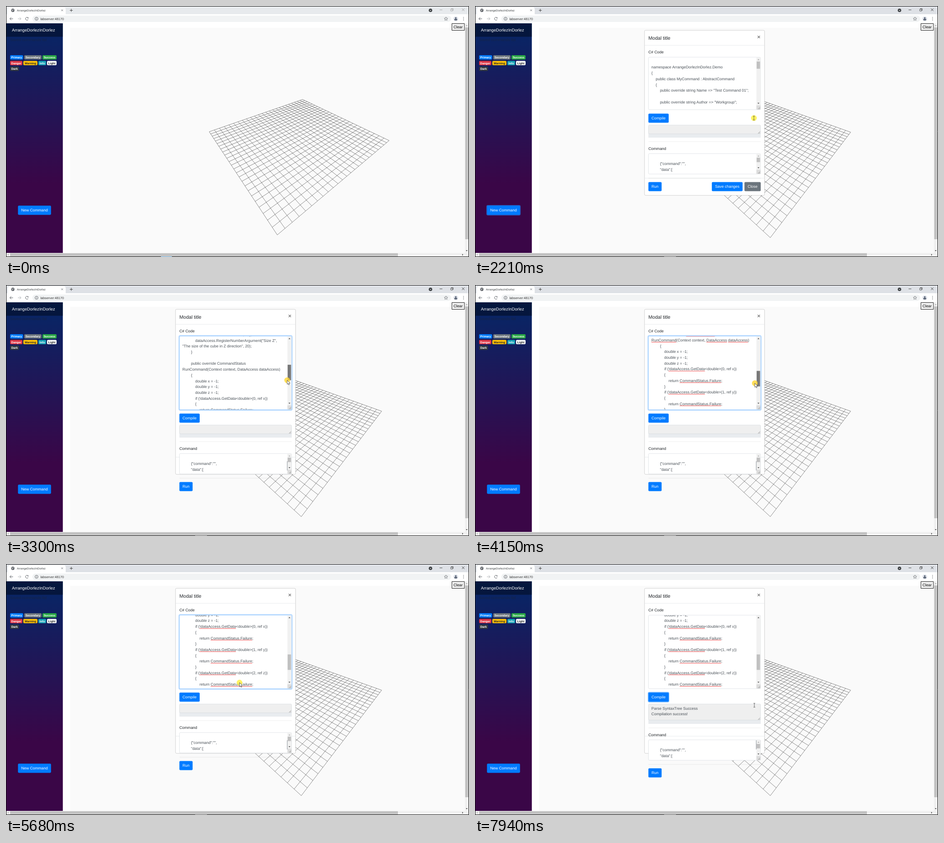
Write an HTML page with a canvas that moves like this. It is 1016x551 px and loops after 8 s.

```html
<!DOCTYPE html>
<html lang="en">
<head>
<meta charset="utf-8">
<title>Command editor</title>
<style>
html, body { margin: 0; width: 100%; height: 100%; overflow: hidden; background: #fff; }
canvas { display: block; }
</style>
</head>
<body>
<canvas id="stage" width="1016" height="551"></canvas>
<script>
const ctx = document.getElementById('stage').getContext('2d');
const LOOP = 8000, LINE = 12.7, SIZE = 8.467;
const APP = 'ArrangeDorlezInDorlez';
const BLUE = '#007bff', INK = '#212529', CODE_INK = '#495057';
const ARROW = '#505050', ARROW_OFF = '#a8a8a8';

const CODE = `
namespace ${APP}.Demo
{
    public class MyCommand : AbstractCommand
    {
        public override string Name => "Test Command 01";

        public override string Author => "Workgroup";

        public override string Description =>
"Creates a cube with the given size in the
current context";

        public override void
RegisterInputs(DataAccess dataAccess)
        {
            dataAccess.RegisterNumberArgument("Size X",
"The size of the cube in X direction", 20);
            dataAccess.RegisterNumberArgument("Size Y",
"The size of the cube in Y direction", 20);
            dataAccess.RegisterNumberArgument("Size Z",
"The size of the cube in Z direction", 20);
        }

        public override CommandStatus
RunCommand(Context context, DataAccess dataAccess)
        {
            double x = -1;
            double y = -1;
            double z = -1;
${['x', 'y', 'z'].map((v, i) => `            if (!dataAccess.GetData<double>(${i}, ref ${v}))
            {
                return CommandStatus.Failure;
            }`).join('\n')}

            context.AddCube(x, y, z, 20, 20, 20);

            return CommandStatus.Success;
        }
    }
}
`.split('\n');
const COMMAND = ['', '        {"command":"",', '        "data":[', '        ]}'];
const OUTPUT = ['Parse SyntaxTree Success', 'Compilation success!'];
const MISSPELT = /!?dataAccess(\.\w+)?|DataAccess|RunCommand|CommandStatus(\.\w+)?/g;

const BADGES = [
  ['Primary', 9, 108, 28.5, BLUE], ['Secondary', 40, 108, 38, '#6c757d'], ['Success', 80, 108, 31, '#28a745'],
  ['Danger', 9, 120.5, 27, '#dc3545'], ['Warning', 38, 120.5, 31, '#ffc107', INK],
  ['Info', 71, 120.5, 17, '#17a2b8'], ['Light', 90, 120.5, 21, '#f8f9fa', INK], ['Dark', 9, 133, 19.5, '#343a40']
];

// time, x, y, pointer shape
const POINTER = [
  [150, 882, 302, 'arrow'], [300, 622, 302, 'arrow'], [460, 622, 302, 'arrow'], [800, 690, 306, 'arrow'],
  [1230, 62, 450, 'hand'], [1450, 62, 450, 'arrow'], [1950, 612, 246, 'beam'], [2220, 612, 246, 'beam'],
  [2380, 624, 224, 'resize'], [2450, 624, 224, 'resize'], [2910, 624, 270, 'arrow'], [2990, 624, 268, 'arrow'],
  [3080, 620, 155, 'arrow'], [3300, 617, 209, 'arrow'], [3830, 615, 212, 'arrow'], [4150, 614, 215.5, 'arrow'],
  [4460, 614, 215.5, 'arrow'], [4930, 613, 233, 'arrow'], [5220, 613, 233, 'arrow'], [5400, 613, 227, 'arrow'],
  [5980, 402, 297, 'hand'], [6930, 402, 297, 'hand'], [7000, 408, 300, 'beam'], [7310, 613, 316, 'beam'],
  [7470, 613, 316, 'beam'], [7560, 624, 323, 'resize'], [7800, 624, 339, 'beam'], [7940, 613, 310, 'beam']
];
const SCROLL = [[3080, 0], [3300, 254], [3750, 300], [3830, 300], [4150, 318.3], [4230, 318.3],
  [4460, 318.3], [4930, 393], [5220, 393], [5400, 365.6]];

const mix = (a, b, k) => a + (b - a) * k;
function ease(t, from, to) {
  const k = Math.min(1, Math.max(0, (t - from) / (to - from)));
  return k * k * (3 - 2 * k);
}
function track(keys, t, col = 1) {
  const i = keys.findIndex(k => k[0] > t);
  if (i < 0) return keys.at(-1)[col];
  if (!i) return keys[0][col];
  return mix(keys[i - 1][col], keys[i][col], ease(t, keys[i - 1][0], keys[i][0]));
}

function rect(x, y, w, h, fill) {
  ctx.fillStyle = fill;
  ctx.fillRect(x, y, w, h);
}
function box(x, y, w, h, r, fill, stroke, width = .6) {
  ctx.beginPath();
  ctx.roundRect(x, y, w, h, r);
  if (fill) { ctx.fillStyle = fill; ctx.fill(); }
  if (stroke) { ctx.strokeStyle = stroke; ctx.lineWidth = width; ctx.stroke(); }
}
function disc(x, y, r, fill, stroke) {
  box(x - r, y - r, 2 * r, 2 * r, r, fill, stroke, .9);
}
function path(points, stroke, width = 1, fill) {
  ctx.beginPath();
  for (let i = 0; i < points.length; i += 2) ctx.lineTo(points[i], points[i + 1]);
  if (fill) { ctx.closePath(); ctx.fillStyle = fill; ctx.fill(); }
  if (stroke) { ctx.strokeStyle = stroke; ctx.lineWidth = width; ctx.stroke(); }
}
function text(s, x, y, fill = INK, size = SIZE, align = 'left', weight = 400) {
  ctx.font = `${weight} ${size}px "Liberation Sans", Arial, sans-serif`;
  ctx.textAlign = align;
  ctx.fillStyle = fill;
  ctx.fillText(s, x, y);
}
function button(label, x, y, w, fill, ring) {
  if (ring) box(x - .6, y - .6, w + 1.2, 21.3, 2.7, null, 'rgba(38,143,255,.6)', 1.5);
  box(x, y, w, 20.1, 2.1, fill);
  text(label, x + w / 2, y + 12.9, '#fff', SIZE, 'center');
}
function arrowhead(x, y, dx, dy, fill = ARROW) {
  path([x + dx * 1.4, y + dy * 1.4, x - dx - dy * 2, y - dy - dx * 2, x - dx + dy * 2, y - dy + dx * 2], null, 0, fill);
}
function gripLines(y) {
  for (const d of [2, 4.5]) path([625.5 - d, y, 625.5, y - d], '#777', .7);
}
function grip(y) {
  rect(617.5, y - 9.5, 9, 9, '#dcdcdc');
  gripLines(y - 1);
}
function scrollbar(top, bottom, start, length, { held, scrolled } = {}) {
  rect(617.5, top, 9, bottom - top, '#f1f1f1');
  rect(618, start, 7.5, length, held ? '#787878' : '#c1c1c1');
  arrowhead(622, top + 5, 0, -1, scrolled ? ARROW : ARROW_OFF);
  arrowhead(622, bottom - 5, 0, 1);
}
function textarea(y, h, lines, { scroll = 0, fill = '#fff', focus, misspelt } = {}) {
  if (focus) box(379.7, y - .7, 248, h + 1.4, 2.5, null, 'rgba(0,123,255,.3)', 2);
  box(380.7, y + .3, 246, h - .6, 2.1, fill, focus ? '#80bdff' : '#ced4da');
  ctx.save();
  ctx.beginPath();
  ctx.rect(381, y + .6, 236, h - 1.2);
  ctx.clip();
  lines.forEach((line, i) => {
    const base = y + 12.7 + i * LINE - scroll;
    if (base < y - 4 || base > y + h + 10) return;
    text(line, 387.1, base, CODE_INK);
    if (misspelt) for (const m of line.matchAll(MISSPELT)) {
      const x = 387.1 + ctx.measureText(line.slice(0, m.index)).width;
      path([x, base + 1.6, x + ctx.measureText(m[0]).width, base + 1.6], '#f04040', .9);
    }
  });
  ctx.restore();
}

function drawChrome(active) {
  const ink = '#5f6368', dark = active ? '#222' : '#999';
  rect(0, 0, 1016, 18, active ? '#dee1e6' : '#e7eaed');
  box(4, 3, 127, 18, 4, '#fff');
  disc(15, 9.5, 3.7, ink);
  path([12.5, 8, 14.5, 9, 14, 11.5], '#fff', 1);
  path([15.5, 7, 17.5, 9.5], '#fff', .8);
  text(APP, 24, 11.8, '#3c4043', 6.2);
  path([121.3, 7.6, 125, 11.3], ink, .8);
  path([125, 7.6, 121.3, 11.3], ink, .8);
  path([140, 9.5, 146.5, 9.5], '#444');
  path([143.25, 6.3, 143.25, 12.7], '#444');
  disc(931.5, 9.5, 3.8, '#3c4043');
  arrowhead(931.5, 9.7, 0, .8, '#fff');
  path([951.5, 8.5, 957.5, 8.5], dark, .8);
  box(976, 7, 4, 4, 0, null, dark, .7);
  path([977.3, 7, 977.3, 5.7, 981.3, 5.7, 981.3, 9.7, 980, 9.7], dark, .7);
  path([1000.5, 5.5, 1006, 11], dark, .8);
  path([1006, 5.5, 1000.5, 11], dark, .8);

  rect(0, 18, 1016, 20, '#fff');
  box(58, 21, 919, 14, 7, '#f1f3f4');
  for (const [x, d, c] of [[12, -1, ink], [29.5, 1, '#b4b7ba']]) {
    path([x - 3.5 * d, 28, x + 3.5 * d, 28], c);
    path([x + .3 * d, 24.7, x + 3.6 * d, 28, x + .3 * d, 31.3], c);
  }
  ctx.beginPath();
  ctx.arc(46, 28, 3.2, .5, 5.6);
  ctx.strokeStyle = ink;
  ctx.stroke();
  arrowhead(48.5, 26.3, .9, 0, ink);
  disc(67, 28, 3.4, null, ink);
  path([67, 27.5, 67, 30], ink, .9);
  rect(66.5, 25.8, 1, 1, ink);
  text('labserver:48170', 75.5, 30.6, '#333', 7.2);
  const star = [];
  for (let i = 0; i <= 10; i++) {
    const a = i * Math.PI / 5 - Math.PI / 2, r = i % 2 ? 1.9 : 4;
    star.push(965.5 + r * Math.cos(a), 28.2 + r * Math.sin(a));
  }
  path(star, ink, .8);
  disc(987, 28, 5.3, '#dfe3ea');
  disc(987, 26.4, 1.6, '#4a5568');
  box(983.8, 28.6, 6.4, 2.8, 1.4, '#4a5568');
  for (const y of [25, 28, 31]) disc(1004, y, .8, ink);
}

// Ground plane seen by an orbiting camera; k runs from the first view to the second.
function drawGrid(k) {
  const a = mix(-.1163, .125, k), shift = mix(-.0865, -.125, k);
  const zoom = mix(140.2, 143, k), cy = mix(285.3, 287.2, k);
  const b = Math.sqrt(2 - a * a), cells = 25;
  const project = (i, j) => {
    const p = (i + j) / 2, q = (i - j) / 2;
    const u = p * a + q * b, v = p * b - q * a, w = 1 - .3268 * v;
    return [648 + zoom * (u + shift) / w, cy + .593 * zoom * v / w];
  };
  for (let n = 0; n <= cells; n++) {
    const s = 2 * n / cells - 1;
    path([...project(s, -1), ...project(s, 1)], '#3c3c3c', .6);
    path([...project(-1, s), ...project(1, s)], '#3c3c3c', .6);
  }
}

function drawPage(t) {
  rect(0, 38, 1016, 513, '#fff');
  rect(141, 48, 866, 494, '#fafafa');
  drawGrid(ease(t, 500, 1400));
  box(978.5, 38.5, 27.5, 15, 0, '#efefef', '#222', 1);
  text('Clear', 992, 48.8, '#000', SIZE, 'center');

  const shade = ctx.createLinearGradient(0, 38, 0, 542);
  shade.addColorStop(0, '#052767');
  shade.addColorStop(.7, '#3a0647');
  rect(0, 38, 124.7, 504, shade);
  rect(0, 38, 124.7, 29.5, 'rgba(0,0,0,.4)');
  text(APP, 13, 56, '#fff', 9.31);
  text('Saved commands list', 9, 76.5, 'rgba(33,37,41,.5)');
  for (const [label, x, y, w, fill, ink = '#fff'] of BADGES) {
    box(x, y, w, 9.6, 2.1, fill);
    text(label, x + w / 2, y + 7, ink, 6.35, 'center', 700);
  }
  const over = t > 1200 && t < 1520;
  button('New Command', 26.3, 438.3, 72.5, over ? '#0069d9' : BLUE, t > 1320 && t < 2450);

  rect(1007, 38, 9, 504, '#f1f1f1');
  rect(1007.7, 47, 7, 465, '#c1c1c1');
  arrowhead(1011, 43, 0, -1, ARROW_OFF);
  arrowhead(1011, 537, 0, 1);
  rect(0, 542, 1016, 9, '#f1f1f1');
  rect(9, 542.7, 851, 7, '#c1c1c1');
  arrowhead(4.5, 546, -1, 0, ARROW_OFF);
  arrowhead(1002, 546, 1, 0);
}

function drawModal(t) {
  const shown = ease(t, 1450, 1720);
  if (!shown) return;
  ctx.save();
  ctx.globalAlpha = shown;
  ctx.translate(0, -26 * (1 - shown));
  box(372, 53.3, 263.5, 362.4, 2.6, '#fff', 'rgba(0,0,0,.25)', .7);
  text('Modal title', 380.5, 73.5, INK, 10.58);
  text('×', 622.7, 72, '#777', 12, 'center', 700);
  path([372, 86.3, 635.5, 86.3], '#dee2e6', .7);
  path([372, 378, 635.5, 378], '#dee2e6', .7);
  button('Save changes', 519.7, 386.5, 67.5, BLUE);
  button('Close', 591.3, 386.5, 35.7, '#6c757d');

  const grow = 46 * ease(t, 2450, 2900), extra = 16 * ease(t, 7560, 7800);
  const bottom = 228 + grow, down = grow + extra;
  const scroll = track(SCROLL, t);
  text('C# Code', 380.5, 104.2);
  textarea(112, bottom - 112, CODE, { scroll, focus: t > 2450 && t < 6200, misspelt: t > 3700 });
  const lane = bottom - 141, all = 634;
  scrollbar(112.7, bottom - 9.5, 121.8 + scroll * lane / all, lane * (bottom - 112) / all,
    { held: t > 3060 && t < 5400, scrolled: scroll > 0 });
  grip(bottom - .3);

  const hover = t > 5950 && t < 7000;
  button('Compile', 380.5, 236.2 + grow, 44.5, hover ? '#0062cc' : BLUE, t > 6200);

  const done = t >= 6700, outTop = 261 + grow;
  rect(380.5, outTop + 18 + extra, 246.5, 10, '#e9ecef');
  textarea(outTop, 20 + extra, done ? OUTPUT : [], { fill: '#efefef' });
  if (done && extra < 12) {
    rect(617.5, outTop + .6, 9, 10 + extra, '#f1f1f1');
    arrowhead(622, outTop + 3.8, 0, -1, ARROW_OFF);
    arrowhead(622, outTop + 8, 0, 1);
    grip(outTop + 20 + extra);
  } else {
    gripLines(outTop + 19 + extra);
  }

  path([380.5, 297.8 + down, 627, 297.8 + down], 'rgba(0,0,0,.1)', .7);
  text('Command', 380.5, 315.8 + down);
  textarea(323.7 + down, 45.5, COMMAND);
  scrollbar(324.3 + down, 360 + down, 333 + down, 9.7);
  grip(369 + down);
  if (down > 20) {
    const y = Math.max(387, 324.5 + down);
    rect(616.7, y, .8, 407 - y, '#6c757d');
  }
  path([380.5, 378 + down, 627, 378 + down], 'rgba(0,0,0,.1)', .7);
  button('Run', 380.5, 386.5 + down, 29, BLUE);
  ctx.restore();
}

const SHAPES = {
  arrow() {
    path([0, 0, 0, 9, 2, 7.2, 3.4, 10.2, 4.8, 9.6, 3.5, 6.7, 6.2, 6.5, 0, 0], '#222', .7, '#fff');
  },
  hand() {
    path([-1, 0, .6, 0, .8, 4, 5, 5, 5.2, 8, 4, 11, -1.4, 11, -4, 7, -3, 6, -1, 7.5, -1, 0], '#222', .8, '#fff');
  },
  beam() {
    path([0, -4, 0, 4], '#333', .7);
    for (const y of [-4.3, 4.3]) path([-2, y, 2, y], '#333', .7);
  },
  resize() {
    path([-3, -3, 3, 3], '#222', 1);
    path([-3.8, -3.8, -.8, -3.8, -3.8, -.8], null, 0, '#222');
    path([3.8, 3.8, .8, 3.8, 3.8, .8], null, 0, '#222');
  }
};
function drawPointer(t) {
  if (t < 150) return;
  const x = track(POINTER, t), y = track(POINTER, t, 2);
  const shape = POINTER.findLast(k => k[0] <= t)[3];
  const pressed = t > 3060 && t < 5400;
  if (t < 6000) disc(x, y, 6.3, pressed ? 'rgba(255,214,50,.8)' : 'rgba(255,240,60,.8)');
  ctx.save();
  ctx.translate(x, y);
  SHAPES[shape]();
  ctx.restore();
}

function draw(now) {
  const t = now % LOOP, active = t > 540;
  ctx.textRendering = 'geometricPrecision';
  drawPage(t);
  drawChrome(active);
  box(.5, .5, 1015, 550, 0, null, '#0a0a0a', 1);
  if (active) rect(415, 550, 26, 1, '#777');
  else rect(340, 550, 24, 1, '#76b9ed');
  drawModal(t);
  drawPointer(t);
  requestAnimationFrame(draw);
}
requestAnimationFrame(draw);
</script>
</body>
</html>
```
